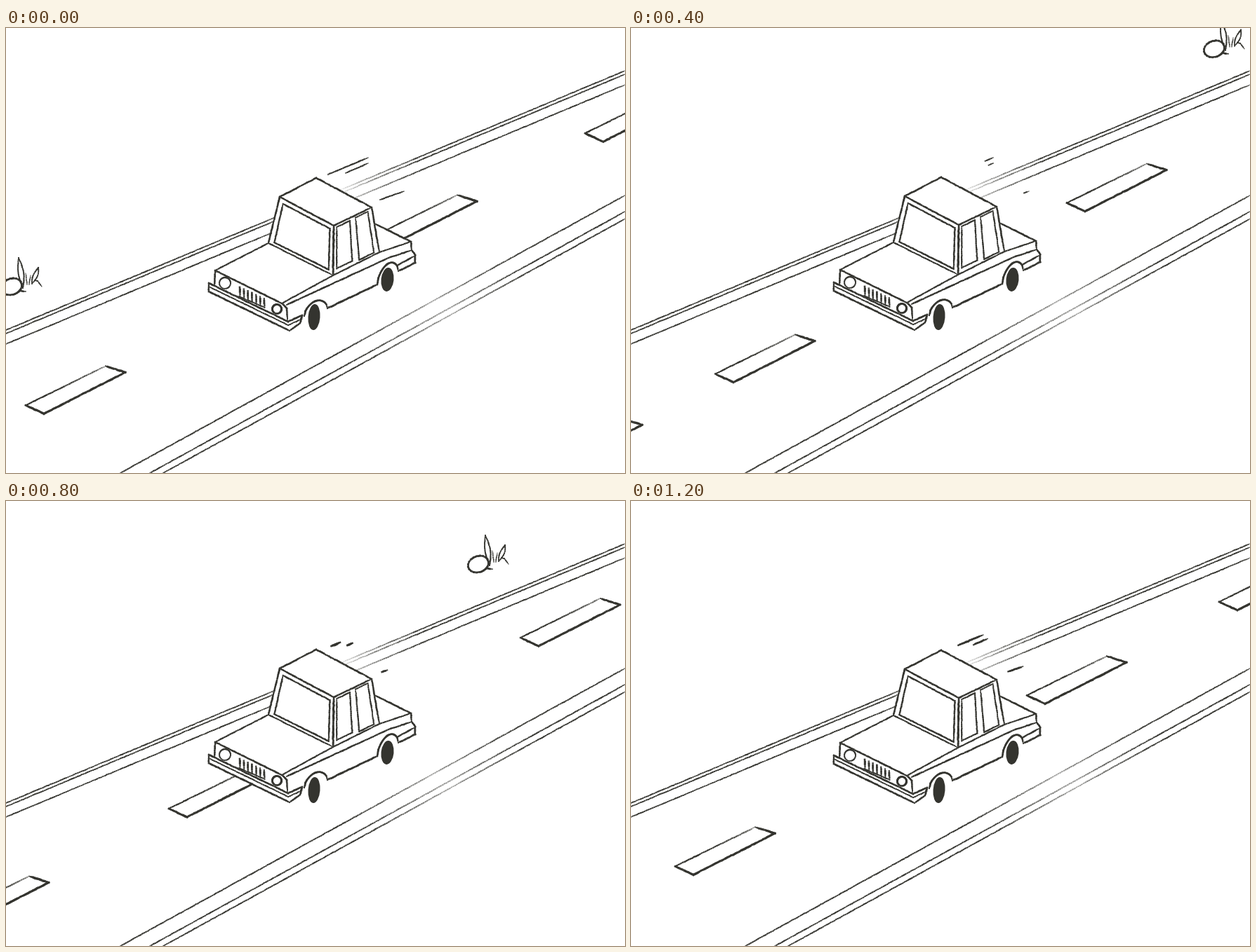
Recreate the animation shown at these times as an HTML page with a canvas. Size 882x635 px, loop 1.28 s.

```html
<!DOCTYPE html>
<html lang="en">
<head>
<meta charset="utf-8">
<title>Driving car</title>
<style>
html, body { margin: 0; width: 100%; height: 100%; overflow: hidden; background: #fff; }
canvas { display: block; }
</style>
</head>
<body>
<canvas id="stage" width="882" height="635"></canvas>
<script>
const ctx = document.getElementById('stage').getContext('2d');
const INK = '#34342f', STEP = 80, STEPS = 16;
const THIN = 1.8, BOLD = 2.6;

const mix = (a, b, t) => a + (b - a) * t;
const lerp = (p, q, t) => [mix(p[0], q[0], t), mix(p[1], q[1], t)];

// Points of a curve f(t), t from 0 to 1
const trace = (f, n = 20) => Array.from({ length: n + 1 }, (_, i) => f(i / n));

function noise(seed) {
  let s = Math.floor(seed * 97 + 13) >>> 0;
  return () => (s = (s * 1664525 + 1013904223) >>> 0) / 4294967296;
}

// Pencil stroke: short segments of uneven weight; alpha(t) fades it along its length
function pencil(pts, width, alpha = () => 1) {
  const rnd = noise(pts[0][0] * 3 + pts[0][1] + 2000);
  const lens = pts.slice(1).map((p, i) => Math.hypot(p[0] - pts[i][0], p[1] - pts[i][1]));
  const total = lens.reduce((a, b) => a + b, 0);
  let from = pts[0], done = 0;
  ctx.strokeStyle = INK;
  ctx.lineCap = 'square';
  lens.forEach((len, i) => {
    const n = Math.max(1, Math.round(len / 3));
    for (let k = 1; k <= n; k++) {
      const shake = k < n ? 0.5 : 0, pos = (done + len * k / n) / total;
      const to = lerp(pts[i], pts[i + 1], k / n).map(v => v + (rnd() - 0.5) * shake);
      const taper = Math.min(1, 0.65 + Math.min(pos, 1 - pos) * total / 12);
      ctx.globalAlpha = Math.min(1, alpha(pos) * (0.8 + rnd() * 0.3));
      ctx.lineWidth = width * taper * (0.85 + rnd() * 0.3);
      ctx.beginPath();
      ctx.moveTo(...from);
      ctx.lineTo(...to);
      ctx.stroke();
      from = to;
    }
    done += len;
  });
  ctx.globalAlpha = 1;
}

function ring(x, y, rx, ry, turn, w) {
  pencil(trace(t => {
    const a = t * Math.PI * 2 + 2, u = Math.cos(a) * rx, v = Math.sin(a) * ry;
    return [x + u * Math.cos(turn) - v * Math.sin(turn), y + u * Math.sin(turn) + v * Math.cos(turn)];
  }), w);
}

function oval(x, y, rx, ry, turn, fill) {
  ctx.beginPath();
  ctx.ellipse(x, y, rx, ry, turn, 0, Math.PI * 2);
  ctx.fillStyle = fill;
  ctx.fill();
}

// Alpha that drops to low around t = at
const dip = (at, spread, low) => t => mix(low, 0.9, Math.min(1, Math.abs(t - at) / spread));

function road() {
  for (const y of [431, 436, 451]) pencil([[0, y], [882, y - 370]], 1.7, dip(0.54, 0.14, 0.05));
  for (const x of [163, 205, 224]) pencil([[x, 635], [882, 635 - (882 - x) * 0.551]], 1.8, dip(0.62, 0.2, 0.3));
}

function dash(x) {
  const y = 552 - 0.487 * x;
  const [left, low, right, top] = [[0, 0], [26, 12], [142, -47], [114, -56]].map(p => [x + p[0], y + p[1]]);
  pencil([left, top], 2, t => 1 - 0.6 * t * t);
  pencil([left, low, right, top], 2.9);
}

// Blade of grass, bulging by w at its middle
function blade(base, tip, w) {
  const side = s => t => {
    const p = lerp(base, tip, t);
    return [p[0] + s * w * Math.sin(Math.PI * t), p[1]];
  };
  pencil([...trace(side(-0.5), 8), ...trace(side(0.6), 8).reverse()], THIN);
}

function plant(x) {
  const d = x - 8;
  ctx.save();
  ctx.translate(x, 369 - 0.45 * d + 4.6e-5 * d * d);
  ring(0, 0, 15, 11.5, -0.35, BOLD);
  blade([16, 2], [10, -41], 7);
  blade([29, -4], [38, -27], 6);
  for (const i of [0, 1]) pencil([[22 + 3 * i, -3], [20 + 7 * i, -19 + 3 * i]], 1.4);
  pencil([[33, -9], [37, -8], [43, 0]], THIN);
  pencil([[13, 6], [20, 7]], BOLD);
  ctx.restore();
}

// Corners of the car
const C = {
  roofL: [390, 241], roofB: [442, 214], roofR: [521, 256], roofF: [467, 282],
  glassL: [374, 307], glassR: [466, 353], pillar: [532, 320],
  deck: [527, 280], tail: [577, 305], tailLow: [578, 317],
  hoodL: [298, 346], hoodR: [393, 393], cheek: [400, 400],
  faceL: [297, 367], faceR: [401, 417],
  bumpL: [289, 364], bumpR: [402, 419], bumpEnd: [422, 410],
  baseL: [289, 376], baseR: [404, 432], baseEnd: [419, 421],
  sillF: [458, 400], sillB: [529, 366], archF: [425, 411], archB: [559, 347],
  rearTop: [583, 324], rearLow: [583, 335]
};
const path = names => names.split(' ').map(n => C[n]);
const edge = (names, w = BOLD) => pencil(path(names), w);

// Rectangle u0..u1, v0..v1 inside a four-cornered panel
function pane(names, u0, u1, v0, v1, w) {
  const [a, b, c, d] = path(names);
  const at = (u, v) => lerp(lerp(a, b, u), lerp(d, c, u), v);
  pencil([at(u0, v0), at(u1, v0), at(u1, v1), at(u0, v1), at(u0, v0)], w);
}

function arch(a, b, lift) {
  pencil(trace(t => {
    const p = lerp(a, b, t);
    return [p[0], p[1] - lift * Math.sqrt(Math.max(0, Math.sin(Math.PI * t)))];
  }), BOLD);
}

function car(bob) {
  ctx.save();
  ctx.translate(0, bob);
  ctx.fillStyle = '#fff';
  ctx.beginPath();
  path('bumpL hoodL glassL roofL roofB roofR deck tail rearTop rearLow archB sillB sillF archF baseEnd baseR baseL')
    .forEach(p => ctx.lineTo(...p));
  ctx.fill();

  edge('glassL roofL roofB roofR pillar', 2.3);
  edge('roofL roofF roofR', 2.3);
  edge('roofF glassR', 2.8);
  pane('roofL roofF glassR glassL', 0.08, 0.93, 0.1, 0.93, 2.2);
  pane('roofF roofR pillar glassR', 0.08, 0.42, 0.06, 0.9, 2);
  pane('roofF roofR pillar glassR', 0.57, 0.89, 0.05, 0.95, 2);

  edge('hoodL glassL glassR', 2);
  edge('faceL hoodL hoodR cheek faceR', 2.3);
  edge('hoodR glassR pillar tail', 2);
  edge('deck tail tailLow', 2.3);
  pencil([[400, 395], [545, 328], C.tailLow], 2.2);
  edge('sillF sillB');
  arch(C.archF, C.sillF, 16);
  arch(C.sillB, C.archB, 20);

  edge('baseR baseL bumpL bumpR bumpEnd baseEnd baseR', 2.4);
  pencil([C.bumpL, C.bumpR, C.bumpEnd].map(p => [p[0], p[1] + 5]), THIN);
  edge('tailLow rearTop rearLow archB');
  pencil([[557, 339], [581, 326]], 2.2);

  ring(312, 364, 8, 8, 0, 2);
  ring(386, 401, 6.5, 6.5, 0, 2.8);
  for (let x = 333; x < 370; x += 5.8) {
    const y = 370 + (x - 333) * 0.46;
    pencil([[x, y], [x + 0.5, y + 13]], BOLD);
  }
  pencil([[332, 383], [369, 399]], THIN);
  ctx.restore();

  oval(439, 412.5, 8.5, 18.5, 0.07, INK);
  oval(543.5, 359, 9, 17, 0.1, INK);
}

// Wind streaks, each shown from t0 to t1 of its length
const streaks = [[[459, 209], [516, 185]], [[484, 207], [516, 193]], [[533, 245], [567, 233]]];
function wind([t0, t1], w) {
  for (const [a, b] of streaks) pencil([lerp(a, b, t0), lerp(a, b, t1)], w);
}

// Four-step driving cycle: dashes come in pairs 501 apart plus a single one
const GAP = 501;
const cycle = [
  { pair: 28, single: 825, gust: [0, 1], weight: 2 },
  { pair: 120, single: -126, gust: [0.8, 1], weight: 2 },
  { pair: 232, single: -81, gust: [0.08, 0.3], weight: 3.4 },
  { pair: 63, single: 838, gust: [0.13, 0.75], weight: 2.6 }
];

// Plant positions; it passes twice, then stays away until the loop restarts
const pass = [8, 148, 336, 513, 673, 831];

function draw(step) {
  const phase = step % 4, { pair, single, gust, weight } = cycle[phase];
  ctx.fillStyle = '#fff';
  ctx.fillRect(0, 0, 882, 635);
  road();
  [pair, pair + GAP, single].forEach(dash);
  if (step < 2 * pass.length) plant(pass[step % pass.length]);
  car(Math.cos(phase * Math.PI / 2) - 1);
  wind(gust, weight);
}

let shown = -1;
function tick() {
  const step = Math.floor(performance.now() / STEP) % STEPS;
  if (step !== shown) draw(shown = step);
  requestAnimationFrame(tick);
}
tick();
</script>
</body>
</html>
```
